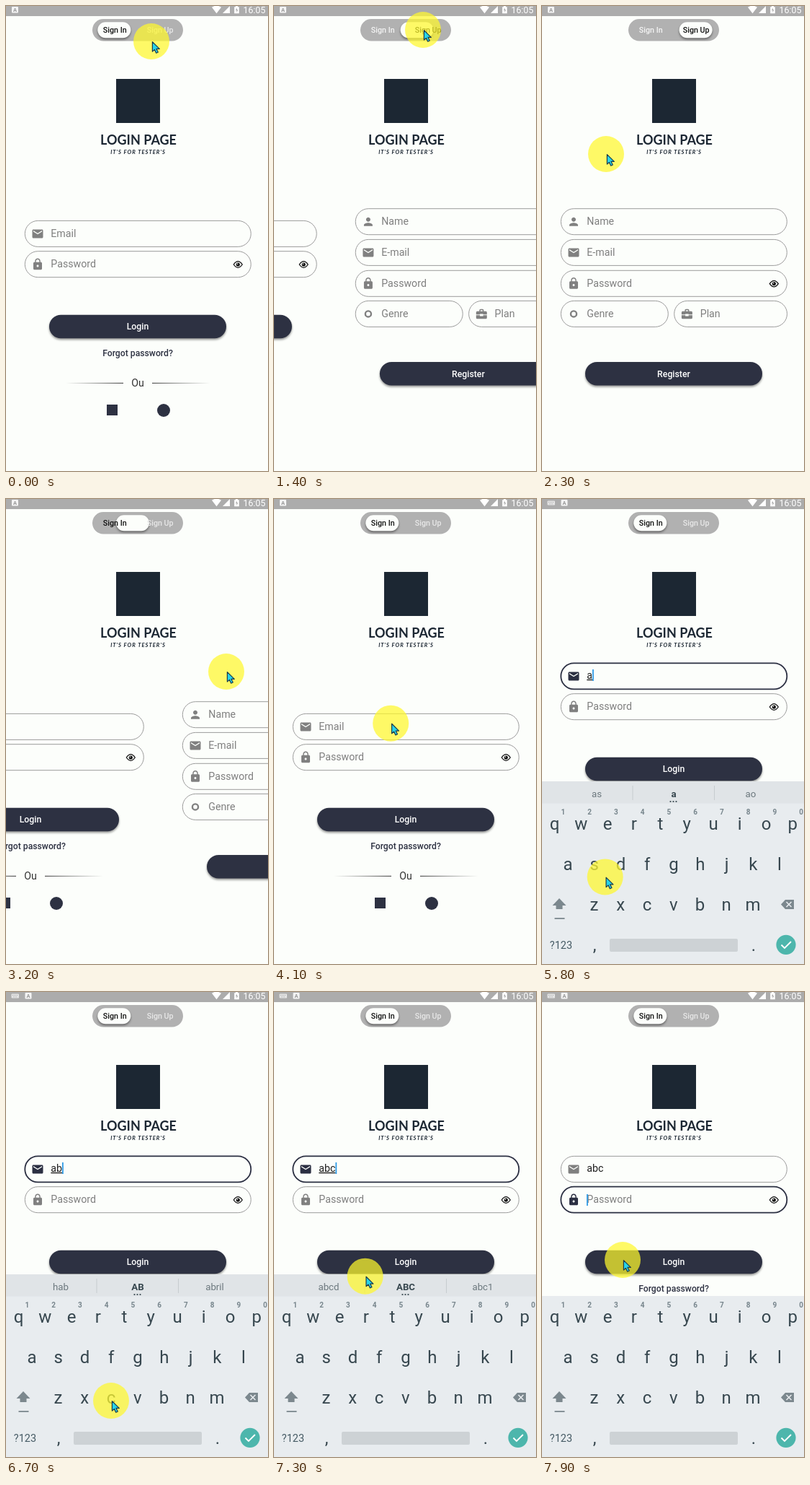
Recreate the animation shown at these times as an HTML page. Size 364 by 644 pixels, loop 8000 ms.

```html
<!DOCTYPE html>
<html lang="en">
<head>
<meta charset="utf-8">
<title>Login page</title>
<style>
  html, body { margin: 0; width: 100%; height: 100%; overflow: hidden; background: #fcfefb; }
  svg { display: block; width: 364px; height: 644px; font-family: Roboto, sans-serif; }
  .mid { text-anchor: middle; }
  .medium { font-weight: 500; }
  .hint { font-size: 14.2px; fill: #7f7f7f; }
  .field { fill: none; stroke: #9c9c9c; stroke-width: 1; }
  .icon { fill: #808080; color: #808080; }
  .focus .field { stroke: #2b2f42; stroke-width: 1.8; }
  .focus .icon { fill: #2b2f42; }
  .soft { filter: drop-shadow(0 2px 1.5px rgba(0, 0, 0, .42)); }
  .key { font-size: 24px; fill: #37474f; text-anchor: middle; }
  .digit { font-size: 10px; font-weight: 700; fill: #78868d; text-anchor: middle; }
  .word { font-size: 13.3px; fill: #6c787e; text-anchor: middle; }
  .bold { font-weight: 700; fill: #37474f; }
</style>
</head>
<body>
<svg id="stage" viewBox="0 0 364 644"></svg>
<script>
const LOOP = 8000, PAGE = 368, LIFT = 70, NAVY = '#2d3142', BAR = '#acacac';

const ICONS = {
  mail: '<path d="M20 4H4c-1.1 0-2 .9-2 2v12c0 1.1.9 2 2 2h16c1.1 0 2-.9 2-2V6c0-1.1-.9-2-2-2zm0 4l-8 5-8-5V6l8 5 8-5v2z"/>',
  lock: '<path d="M18 8h-1V6c0-2.76-2.24-5-5-5S7 3.24 7 6v2H6c-1.1 0-2 .9-2 2v10c0 1.1.9 2 2 2h12c1.1 0 2-.9 2-2V10c0-1.1-.9-2-2-2zm-6 9c-1.1 0-2-.9-2-2s.9-2 2-2 2 .9 2 2-.9 2-2 2zm3.1-9H8.9V6c0-1.71 1.39-3.1 3.1-3.1s3.1 1.39 3.1 3.1v2z"/>',
  person: '<path d="M12 12c2.21 0 4-1.79 4-4s-1.79-4-4-4-4 1.79-4 4 1.79 4 4 4zm0 2c-2.67 0-8 1.34-8 4v2h16v-2c0-2.66-5.33-4-8-4z"/>',
  ring: '<circle cx="12" cy="12" r="5.4" fill="none" stroke="currentColor" stroke-width="3.2"/>',
  bag: '<path d="M8 7V5q0-2 2-2h4q2 0 2 2v2h4q2 0 2 2v4h-7v-1h-6v1H2V9q0-2 2-2zm2 0h4V5h-4zM2 14.5h7V16h6v-1.5h7V19q0 2-2 2H4q-2 0-2-2z"/>'
};

const text = (x, y, str, cls, more = '') => `<text x="${x}" y="${y}" class="${cls}" ${more}>${str}</text>`;
const rect = (x, y, w, h, r, more) => `<rect x="${x}" y="${y}" width="${w}" height="${h}" rx="${r}" ${more}/>`;
const glyph = (name, x, y) => `<g class="icon" transform="translate(${x - 9} ${y - 9}) scale(.75)">${ICONS[name]}</g>`;
const eye = (x, y) => `<path d="M${x - 6} ${y}q6 -8.6 12 0q-6 8.6 -12 0z" fill="none" stroke="#111" stroke-width="1.3"/>
  <circle cx="${x}" cy="${y}" r="2.6" fill="#111"/><circle cx="${x - .8}" cy="${y - .8}" r=".8" fill="#fff"/>`;
const field = (icon, label, y, x = 26, w = 314, id = '') => `<g id="${id}">
  ${rect(x + .3, y - 18, w, 36, 18, 'class="field"')}
  ${glyph(icon, x + 18, y)}${text(x + 36.3, y + 4.2, label, 'hint')}</g>`;
const button = (label, y) => rect(60, y - 16.3, 246, 32.6, 16.3, `class="soft" fill="${NAVY}"`) +
  text(183, y + 4.2, label, 'mid medium', 'font-size="12.3" fill="#fff"');

const signIn = field('mail', 'Email', 315.4, 26, 314, 'email') +
  field('lock', 'Password', 357.7, 26, 314, 'pass') + eye(322.3, 358) +
  '<text id="typed" x="62.3" y="318.8" font-size="14.2" fill="#222"></text>' +
  '<rect id="caret" width="1.8" height="16" fill="#2f9be6"/>' +
  button('Login', 444) +
  text(183, 485, 'Forgot password?', 'mid medium', `font-size="12.2" fill="${NAVY}"`) +
  rect(83, 521.8, 80, 1, 0, 'fill="url(#fadeIn)"') + rect(203, 521.8, 81, 1, 0, 'fill="url(#fadeOut)"') +
  text(183, 527, 'Ou', 'mid', 'font-size="14.2" fill="#333"') +
  rect(140, 552, 15, 15, 0, `fill="${NAVY}"`) + `<circle cx="219" cy="560" r="9" fill="${NAVY}"/>`;

const signUp = field('person', 'Name', 298.7) + field('mail', 'E-mail', 341.4) +
  field('lock', 'Password', 384.3) + eye(322.3, 384.6) +
  field('ring', 'Genre', 426.4, 26, 149) + field('bag', 'Plan', 426.4, 183.4, 156.8) +
  button('Register', 509.3);

const row = (letters, x, y) => [...letters].map((c, i) => text(x + i * 36.75, y, c, 'key')).join('');
const keyboard = rect(0, 421, 364, 223, 0, 'fill="#e8ecef"') +
  `<g id="strip">${rect(0, 391, 364, 30.5, 0, 'fill="#e0e4e7"')}
    <path d="M126 397v20M239.5 397v20" stroke="#c6cccf"/>
    ${text(76, 412.5, '', 'word')}${text(183, 412.5, '', 'word bold')}${text(290, 412.5, '', 'word')}
    <g id="dots" fill="#37474f"><circle cx="178.5" cy="419" r="1.1"/><circle cx="182.5" cy="419" r="1.1"/><circle cx="186.5" cy="419" r="1.1"/></g></g>` +
  [...'1234567890'].map((c, i) => text(29.3 + i * 36.75, 437.3, c, 'digit')).join('') +
  row('qwertyuiop', 17.5, 458) + row('asdfghjkl', 36, 514) + row('zxcvbnm', 72.5, 570) +
  `<path d="M24 553l9.5 10h-5v5h-9v-5h-5z" fill="#7c888e"/>${rect(17.5, 580, 14, 1.8, 0, 'fill="#7c888e"')}
   <path d="M338 555h12v13h-12l-6 -6.5z" fill="#7c888e"/><path d="M339.5 558l7 7m0 -7l-7 7" stroke="#e8ecef" stroke-width="1.6"/>` +
  text(26.5, 623, '?123', 'mid', 'font-size="14.5" fill="#455a64"') + text(73, 626, ',', 'key') + text(294, 626, '.', 'key') +
  rect(94, 609, 178, 18, 2, 'fill="#cdd2d5"') +
  '<circle cx="339" cy="617.3" r="13.6" fill="#4db6ac"/><path d="M332.5 617.5l4.5 4.5l9 -9" fill="none" stroke="#fff" stroke-width="1.9"/>';

const fade = (id, a, b) => `<linearGradient id="${id}"><stop stop-color="#333" stop-opacity="${a}"/><stop offset="1" stop-color="#333" stop-opacity="${b}"/></linearGradient>`;

stage.innerHTML = `<defs>${fade('fadeIn', 0, 1)}${fade('fadeOut', 1, 0)}</defs>
  ${rect(0, 0, 364, 644, 0, 'fill="#fcfefb"')}
  ${rect(153, 101, 61, 61, 0, 'fill="#1c2733"')}
  ${text(184, 192.3, 'LOGIN PAGE', 'mid', 'font-family="Lato, sans-serif" font-weight="700" font-size="18" fill="#1c2733"')}
  ${text(183.5, 205, 'IT\'S FOR TESTER\'S', 'mid', 'font-family="Lato, sans-serif" font-style="italic" font-weight="700" font-size="7.6" letter-spacing="1" fill="#1c2733"')}
  <g id="inPage">${signIn}</g><g id="upPage">${signUp}</g>
  ${rect(120, 18, 126, 30.5, 15.2, 'fill="#b1b1b1"')}
  ${rect(127.3, 22.3, 46, 22, 11, 'id="pill" class="soft" fill="#fcfefb"')}
  ${text(151.2, 37.2, 'Sign In', 'mid medium', 'id="inTab" font-size="10.7"')}
  ${text(214.2, 37.2, 'Sign Up', 'mid medium', 'id="upTab" font-size="10.7"')}
  ${rect(0, 0, 364, 14, 0, `fill="${BAR}"`)}
  <g id="kbIcon">${rect(7.5, 2.5, 10.5, 6, 1, 'fill="#e4e4e4"')}<path d="M9 4.5h8M10 6.8h6" stroke="${BAR}" stroke-dasharray="1 1"/></g>
  <g id="langIcon">${rect(8, 1, 9, 8.5, 1, 'fill="#f4f4f4"')}${text(12.5, 8, 'A', 'mid', 'font-size="7.5" font-weight="700" fill="#999"')}</g>
  <g fill="#fff"><path d="M286 1.8q6.5 -4.4 13 0l-6.5 8.4zM311 0v10h-10z"/>
    <path d="M319 0h3v1.2h1.8v9h-6.6v-9h1.8z"/>${text(345, 9.6, '16:05', 'mid', 'font-size="12.4"')}</g>
  <path d="M321 2.5l-2 3.5h1.4v3l2 -3.8h-1.4z" fill="${BAR}"/>
  <g id="keys">${keyboard}</g>
  <g id="pointer"><circle r="25" fill="rgba(255,249,45,.72)"/>
    <path d="M1.4 .6v13.5l3 -2.7l2.3 4.8l2.6 -1.2l-2.3 -4.6h4.3z" fill="#27d3e8" stroke="#1d3b4a" stroke-width="1.2" stroke-linejoin="round"/></g>`;

const $ = id => document.getElementById(id);
const words = [...$('strip').querySelectorAll('.word')];
const clamp = v => Math.max(0, Math.min(1, v));
const part = (t, from, to) => clamp((t - from) / (to - from));
const smooth = v => v * v * (3 - 2 * v);
const slowDown = v => 1 - (1 - v) ** 2;
const move = (id, x, y) => $(id).setAttribute('transform', `translate(${x} ${y})`);
const show = (id, on) => $(id).setAttribute('visibility', on ? 'inherit' : 'hidden');

// time, x, y
const PATH = [
  [0, 202, 49], [150, 202, 49], [800, 207, 33], [1850, 207, 33], [2300, 89, 205], [2550, 66, 240],
  [2780, 66, 243], [3200, 306, 239], [3300, 325, 238], [3600, 318, 243], [4200, 150, 316],
  [4500, 150, 316], [5000, 63, 504], [5300, 41, 508], [5650, 41, 508], [6100, 219, 567],
  [6350, 219, 567], [6700, 146, 566], [7050, 146, 566], [7480, 115, 290], [7650, 115, 290],
  [7900, 112, 371], [8000, 112, 378]
];
// time, typed text, three suggestions
const TYPING = [
  [0, '', '', '', ''], [5550, 'a', 'as', 'a', 'ao'],
  [6250, 'ab', 'hab', 'AB', 'abril'], [6850, 'abc', 'abcd', 'ABC', 'abc1']
];

function cursorAt(t) {
  const i = Math.max(1, PATH.findIndex(p => p[0] > t));
  const [t0, x0, y0] = PATH[i - 1], [t1, x1, y1] = PATH[i];
  const k = smooth(part(t, t0, t1));
  return [x0 + (x1 - x0) * k, y0 + (y1 - y0) * k];
}

const dragged = t => Math.max(0, cursorAt(t)[0] - 87);

function scrollAt(t) {
  if (t < 2780) return PAGE * slowDown(part(t, 1144, 1644));
  if (t < 3250) return PAGE - dragged(t);
  return (PAGE - dragged(3250)) * (1 - slowDown(part(t, 3250, 3600)));
}

function draw(t) {
  const scroll = scrollAt(t), ratio = scroll / PAGE;
  const rise = slowDown(part(t, 4400, 4650));
  const lift = LIFT * slowDown(part(t, 4450, 4680));
  move('inPage', -scroll, -lift);
  move('upPage', PAGE - scroll, 0);
  move('pill', 63.3 * ratio, 0);
  $('inTab').setAttribute('fill', ratio < .5 ? '#111' : '#f4f4f4');
  $('upTab').setAttribute('fill', ratio < .5 ? '#e8e8e8' : '#111');

  const onPass = t >= 7580, onEmail = t >= 4300 && !onPass;
  $('email').classList.toggle('focus', onEmail);
  $('pass').classList.toggle('focus', onPass);

  const [since, typed, ...hints] = TYPING.filter(s => s[0] <= t).pop();
  $('typed').textContent = typed;
  $('typed').setAttribute('text-decoration', onEmail ? 'underline' : 'none');
  $('email').querySelector('text').setAttribute('visibility', typed ? 'hidden' : 'inherit');
  words.forEach((w, i) => w.textContent = hints[i]);
  show('dots', typed);

  const start = onPass ? 7580 : typed ? since : 4300;
  show('caret', (onEmail || onPass) && (t - start) % 1000 < 500);
  move('caret', onPass || !typed ? 62 : 62.3 + $('typed').getComputedTextLength(), onPass ? 350 : 306);

  move('keys', 0, 255 * (1 - rise));
  show('keys', rise > 0);
  show('strip', t < 7650);
  show('kbIcon', t >= 4400);
  move('langIcon', t >= 4400 ? 18.5 : 0, 0);
  move('pointer', ...cursorAt(t));
}

const begin = performance.now();
function tick() {
  draw((performance.now() - begin) % LOOP);
  requestAnimationFrame(tick);
}
tick();
</script>
</body>
</html>
```
